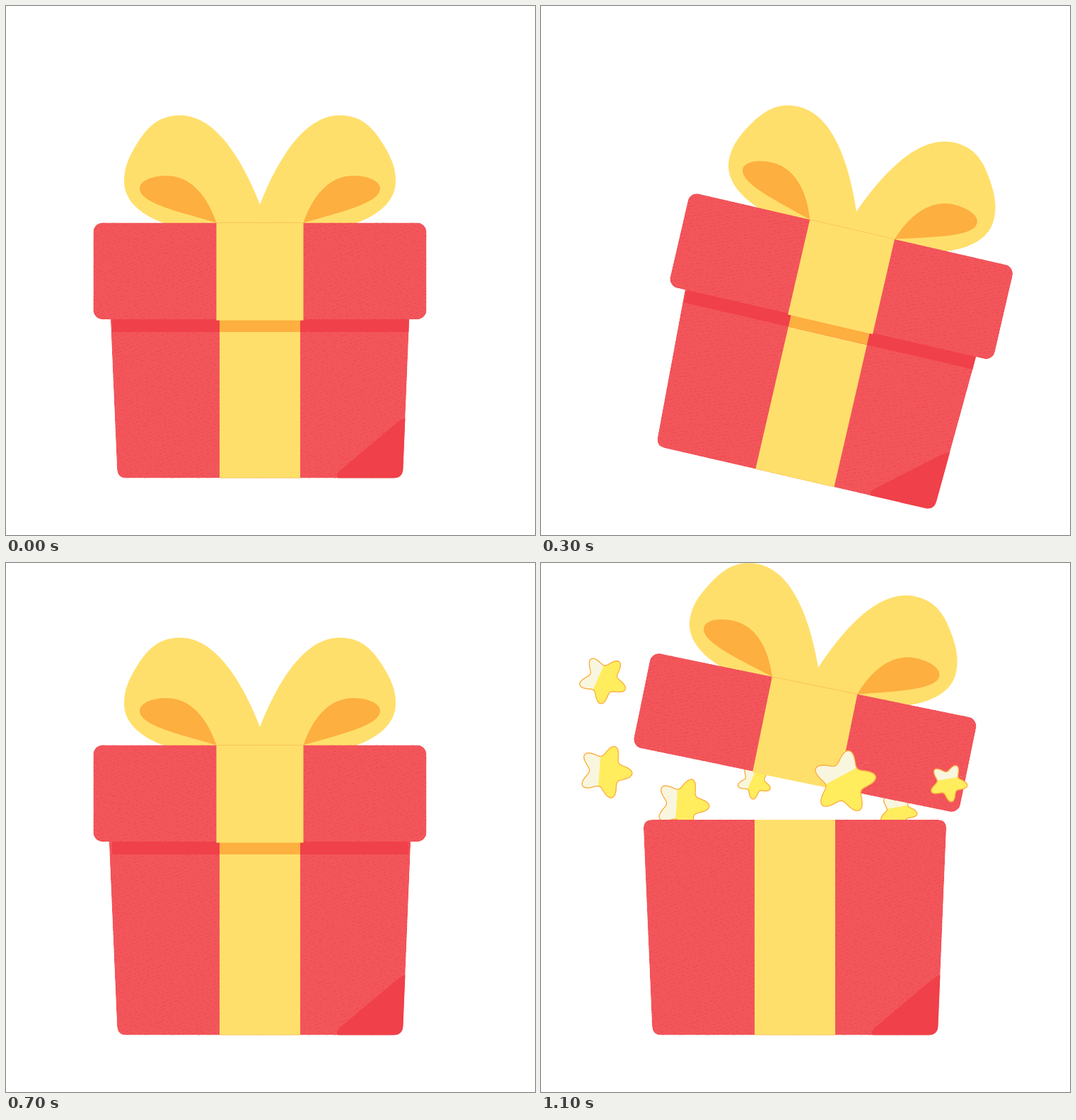
An HTML page that plays this animation: 748 by 748 pixels, repeating every 1200 ms.

```html
<!DOCTYPE html>
<html lang="en">
<head>
<meta charset="utf-8">
<title>Gift box</title>
<style>
  html, body { margin: 0; width: 100%; height: 100%; overflow: hidden; background: #fff; }
  svg { display: block; width: 100vw; height: 100vh; }
  .red { fill: #f2565b; }
  .dark { fill: #f04049; }
  .yellow { fill: #ffdf6b; }
  .orange { fill: #fdaf40; }
  .seam { stroke: #f3bd55; stroke-width: .8; opacity: .6; }
  #grain { fill: none; stroke: #ec3f49; stroke-width: 1.2; opacity: .55; }
</style>
</head>
<body>
<svg viewBox="0 0 748 748">
  <defs>
    <path id="grain"/>
    <path id="baseShape" d="M157.500 363H560.500Q573.500 363 573 376L561.500 654Q561 667.500 548 667.500H170Q157.500 667.500 157 654L145 376Q144.500 363 157.500 363Z"/>
    <rect id="lidShape" x="123.500" y="306.500" width="471" height="136.500" rx="13"/>
    <clipPath id="baseClip"><use href="#baseShape"/></clipPath>
    <clipPath id="lidClip"><use href="#lidShape"/></clipPath>
    <clipPath id="aboveBase"><path d="M0 0H748V363H0Z"/></clipPath>
    <g id="loop">
      <path class="yellow" d="M359.500 282C333 214 295 154.500 246 154.500C214 154.500 198 174 185 195C172 216 167 230 167 248C167 275 190 295 223 307H359.500Z"/>
      <path class="orange" d="M297.500 306.500C285 270 262 240 227 240C205 240 189 248 189 258C189 278 240 290 297.500 306.500Z"/>
    </g>
  </defs>
  <g id="box">
    <g clip-path="url(#baseClip)">
      <use href="#baseShape" class="red"/>
      <use href="#grain"/>
      <path class="dark" d="M566 582Q559 584 553 589L472 657Q465 664 470 669H566Z"/>
      <path class="yellow" d="M302 363H416V668H302Z"/>
      <path class="seam" d="M302 667.300H416"/>
    </g>
    <g id="backStars" clip-path="url(#aboveBase)"></g>
    <g id="lid">
      <g id="shadow">
        <path class="dark" d="M150 440H569.500V461H150Z"/>
        <path class="orange" d="M302 440H416V461H302Z"/>
      </g>
      <use href="#loop"/>
      <use href="#loop" transform="matrix(-1 0 0 1 718 0)"/>
      <g clip-path="url(#lidClip)">
        <use href="#lidShape" class="red"/>
        <use href="#grain"/>
      </g>
      <path class="yellow" d="M297.500 306.500H420.500V444.500H297.500Z"/>
      <path class="seam" d="M297.500 306.500H420.500"/>
    </g>
    <g id="frontStars" clip-path="url(#aboveBase)"></g>
  </g>
</svg>
<script>
const $ = id => document.getElementById(id);
const STEP = 100, COUNT = 12, STARS_FROM = 9;

// Whole-box tilt, then the lid's shift and tilt, per step
const tilts = [0, 11, -12, 13, -15.5, 0];
const lids = { 6: [0, -14, 0], 7: [0, -49, 0], 8: [12, -91, 5.5] };
const openLid = [28, -133.5, 11.6];

// Each star goes from one [x, y, radius, angle] to another
const frontStars = [
  [[84, 197, 41, 24], [88, 165, 34, 24]],
  [[149, 294.5, 51, 4], [91, 295, 38, 4]],
  [[377, 331, 36, 62], [429, 310, 45, 62]],
  [[502, 325, 27, 34], [576, 311, 27, 80]]
];
const backStars = [
  [[214, 405, 38, 4], [200, 341.5, 38, 4]],
  [[312, 392, 24, 24], [302, 310, 24, 24]],
  [[490, 392, 27, 80], [505, 351, 27, 80]]
];

let seed = 7;
const random = () => (seed = seed * 16807 % 2147483647) / 2147483647;

// Short broken strokes running up to the right
function grainPath() {
  const slope = Math.tan(-22 * Math.PI / 180);
  let d = "";
  for (let row = 300; row < 930; row += 5.2) {
    for (let x = 115; x < 605; x += 4 + random() * 6) {
      const y = row + (x - 115) * slope + random() * 2 - 1;
      const len = 1 + random() * 3.5;
      if (y > 295 && y < 672)
        d += `M${x.toFixed(1)} ${y.toFixed(1)}l${len.toFixed(1)} ${(len * slope).toFixed(1)}`;
    }
  }
  return d;
}

// Outline of a soft star of radius r; the cut keeps the pale left part
function starPath(r, cut = r) {
  let d = "";
  for (let i = 0; i < 120; i++) {
    const a = i * Math.PI / 60;
    const p = r * (.775 + .205 * Math.cos(5 * a) + .02 * Math.cos(10 * a));
    const x = Math.min(p * Math.cos(a), cut);
    d += `${i ? "L" : "M"}${x.toFixed(2)} ${(p * Math.sin(a)).toFixed(2)}`;
  }
  return d + "Z";
}

function starMarkup([from, to], k) {
  const [x, y, r, angle] = from.map((v, i) => v + (to[i] - v) * k);
  const outline = starPath(r);
  return `<g transform="translate(${x} ${y}) rotate(${angle})">
    <path d="${outline}" fill="#ffed5e"/>
    <path d="${starPath(r, -.22 * r)}" fill="#f9f6df"/>
    <path d="${outline}" fill="none" stroke="#fdaf40" stroke-width="1.4"/></g>`;
}

function draw(step) {
  const [dx, dy, turn] = step < 6 ? [0, 0, 0] : lids[step] || openLid;
  $("box").setAttribute("transform", `rotate(${tilts[step] || 0} 359 667)`);
  $("lid").setAttribute("transform", `translate(${dx} ${dy}) rotate(${turn} 358.5 307)`);
  $("shadow").style.display = dy < -60 ? "none" : "";
  const k = (step - STARS_FROM) / (COUNT - 1 - STARS_FROM);
  const show = list => k < 0 ? "" : list.map(s => starMarkup(s, k)).join("");
  $("backStars").innerHTML = show(backStars);
  $("frontStars").innerHTML = show(frontStars);
}

$("grain").setAttribute("d", grainPath());
let shown = 0;
draw(0);
const start = performance.now();
function tick() {
  const step = Math.floor((performance.now() - start) / STEP) % COUNT;
  if (step !== shown) draw(shown = step);
  requestAnimationFrame(tick);
}
requestAnimationFrame(tick);
</script>
</body>
</html>
```
